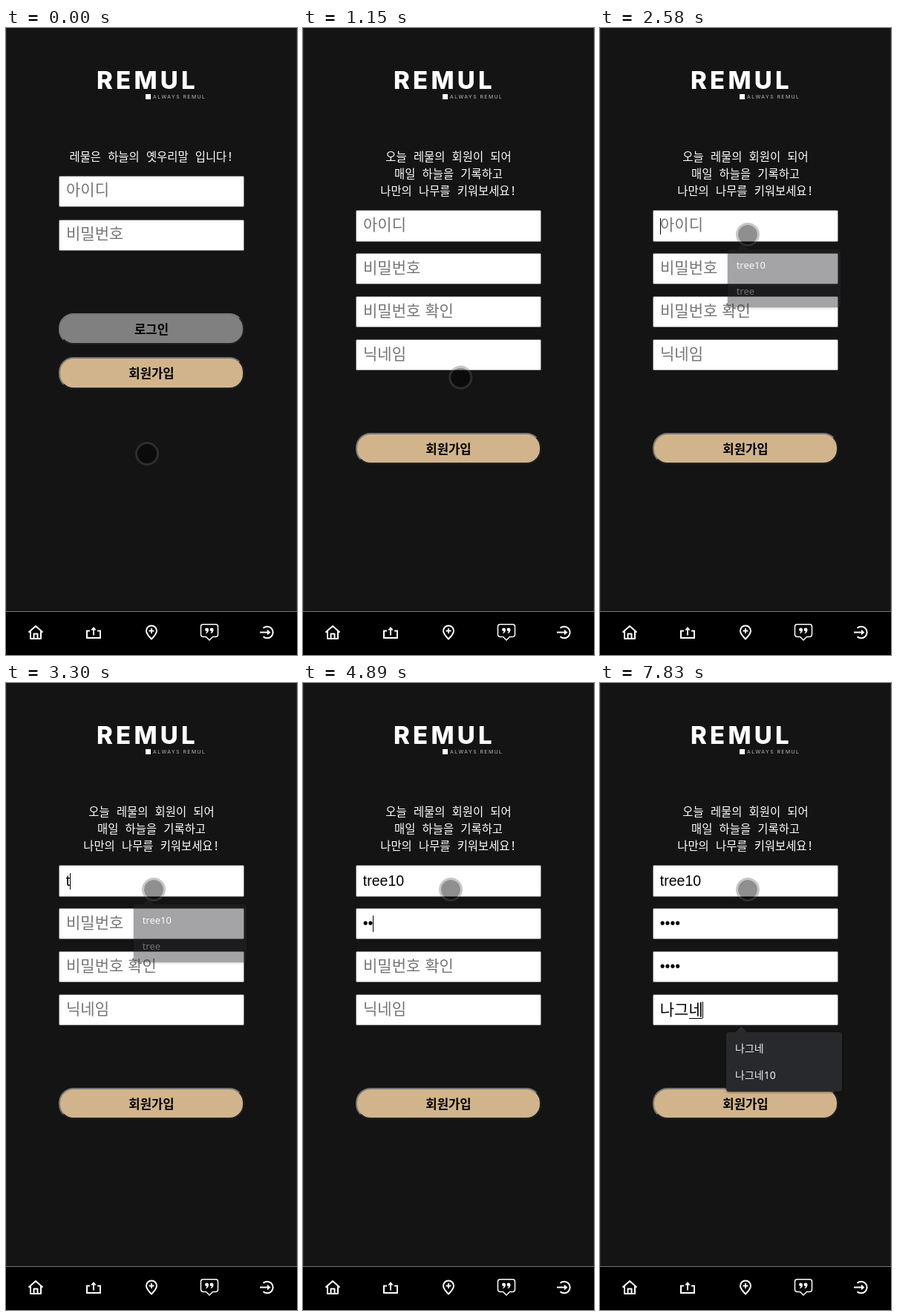
An HTML page for the animation above (8000 ms loop, 392 by 844 pixels).

```html
<!DOCTYPE html>
<html lang="ko">
<head>
<meta charset="utf-8">
<title>Sign up</title>
<style>
  html, body { margin: 0; width: 100%; height: 100%; overflow: hidden; background: #141414; }
  svg { display: block; width: 392px; height: 844px; }
  text { font-family: "Noto Sans CJK KR", "Noto Sans CJK", sans-serif; }
  .brand, .tag { font-family: Inter, "Open Sans", sans-serif; fill: #fff; }
  .brand { font-size: 33px; font-weight: 800; letter-spacing: 4.2px; }
  .tag { font-size: 6.8px; letter-spacing: 1.5px; fill: #bdbdbd; }
  .intro { font: 500 15.4px "Noto Sans Mono", "Noto Sans CJK KR", "Noto Sans CJK", monospace; fill: #fff; text-anchor: middle; }
  .hint { font-size: 21px; font-weight: 350; fill: #757575; }
  .latin { font-family: "Liberation Sans", Arial, sans-serif; font-size: 19.5px; }
  .hangul { font-size: 21px; font-weight: 350; }
  .label { font-size: 16.7px; font-weight: 700; text-anchor: middle; }
  .item { font: 13.3px "Noto Sans", "Noto Sans CJK KR", "Noto Sans CJK", sans-serif; fill: #f1f1f1; }
  .item.ko { font-size: 14px; }
  #popup { filter: drop-shadow(0 1px 1.5px rgba(0, 0, 0, .5)); }
  .icon { fill: none; stroke: #fff; stroke-width: 2; }
</style>
</head>
<body>
<svg viewBox="0 0 392 844" xmlns="http://www.w3.org/2000/svg">
  <rect width="392" height="844" fill="#141414"/>
  <path d="M.5 0V785M391.5 0V785" stroke="#282828"/>
  <text class="brand" x="122" y="82">REMUL</text>
  <rect x="188" y="89" width="7" height="7" fill="#fff"/>
  <text class="tag" x="198" y="94.5">ALWAYS REMUL</text>
  <g id="login"></g>
  <g id="join"></g>
  <rect id="caret" width="1" height="22"/>
  <path id="underline" stroke="#000"/>
  <g id="pointer">
    <circle r="13" fill="#000" fill-opacity=".44"/>
    <circle r="14.5" fill="none" stroke="#5f5f5f" stroke-opacity=".35" stroke-width="3"/>
  </g>
  <g id="popup"></g>

  <rect y="785" width="392" height="59"/>
  <path d="M0 785.5H392" stroke="#777"/>
  <g class="icon">
    <path d="M30.5 813.5L40 805L49.5 813.5M33 811.5V822H47V811.5M37.5 822V815.5H42.5V822" stroke-linejoin="round"/>
    <path d="M113 811.5H109V821H127V811.5H123M118 817.5V808"/>
    <path d="M114.2 810.5L118 806L121.8 810.5Z" fill="#fff" stroke="none"/>
    <path d="M196 822.5C191.5 818 189 815 189 811.5A7 7 0 0 1 203 811.5C203 815 200.500 818 196 822.500ZM192.500 811.500H199.500M196 808V815"/>
    <path d="M265.500 802.700H282.500A3 3 0 0 1 285.500 805.700V816.500A3 3 0 0 1 282.500 819.500H278.500L274 824L269.500 819.500H265.500A3 3 0 0 1 262.500 816.500V805.700A3 3 0 0 1 265.500 802.700Z" stroke-width="1.500"/>
    <g fill="#fff" stroke="none">
      <circle cx="270.500" cy="809.800" r="2.400"/><circle cx="277" cy="809.800" r="2.400"/>
      <path d="M272.900 809.500C273 812.500 272 814.200 269.500 815L269 814C270.500 813.200 270.800 812.500 270.800 811.500ZM279.400 809.500C279.500 812.500 278.500 814.200 276 815L275.500 814C277 813.200 277.300 812.500 277.300 811.500Z"/>
    </g>
    <path d="M346.500 807.800A7.800 7.800 0 1 1 346.500 819.200M342 813.500H353"/>
    <path d="M352 809.800L356.500 813.500L352 817.200Z" fill="#fff" stroke="none"/>
  </g>
</svg>
<script>
const LOOP = 8000;
const $ = id => document.getElementById(id);

function add(parent, tag, attrs, content) {
  const el = document.createElementNS('http://www.w3.org/2000/svg', tag);
  for (const k in attrs) el.setAttribute(k, attrs[k]);
  if (content) el.textContent = content;
  parent.appendChild(el);
  return el;
}
const set = (el, attrs) => { for (const k in attrs) el.setAttribute(k, attrs[k]); };
const show = (el, on) => el.setAttribute('display', on ? 'inline' : 'none');

// Last entry of a [time, ...values] list that has started
const at = (list, t) => list.reduce((found, e) => e[0] <= t ? e : found, list[0]);

function intro(page, lines) {
  lines.forEach((s, i) => add(page, 'text', { class: 'intro', x: 196, y: 178.5 + 23 * i }, s));
}

function field(page, y, h, hintY, hint) {
  add(page, 'rect', { x: 71.5, y: y + .5, width: 249, height: h - 1, rx: 1.5, fill: '#fff', stroke: '#767676' });
  return add(page, 'text', { class: 'hint', x: 81, y: hintY }, hint);
}

// Outset border: the two colours meet on the diagonals of two corners
function button(page, y, h, fill, label) {
  const r = 19, d = r * (1 - Math.SQRT1_2), x0 = 72, x1 = 320, y0 = y + 1, y1 = y + h - 1;
  const arc = (x, y) => `A${r} ${r} 0 0 1 ${x} ${y}`;
  const low = `${x0 + d} ${y1 - d}`, high = `${x1 - d} ${y0 + d}`;
  add(page, 'rect', { x: x0, y: y0, width: x1 - x0, height: y1 - y0, rx: r, fill });
  const edge = path => add(page, 'path', { d: path, fill: 'none', 'stroke-width': 2 });
  const lit = edge(`M${low}${arc(x0, y1 - r)}V${y0 + r}${arc(x0 + r, y0)}H${x1 - r}${arc(x1 - d, y0 + d)}`);
  const dark = edge(`M${high}${arc(x1, y0 + r)}V${y1 - r}${arc(x1 - r, y1)}H${x0 + r}${arc(x0 + d, y1 - d)}`);
  add(page, 'text', { class: 'label', x: 196, y: y + h / 2 + 6.7 }, label);
  const press = down => {
    lit.setAttribute('stroke', down ? '#202020' : '#767676');
    dark.setAttribute('stroke', down ? '#767676' : '#202020');
  };
  press(false);
  return press;
}

const login = $('login'), join = $('join');
intro(login, ['레물은 하늘의 옛우리말 입니다!']);
field(login, 199, 42, 225, '아이디');
field(login, 258, 42, 284, '비밀번호');
button(login, 384, 42, '#808080', '로그인');
const pressJoin = button(login, 443, 43, '#d2b48c', '회원가입');

intro(join, ['오늘 레물의 회원이 되어', '매일 하늘을 기록하고', '나만의 나무를 키워보세요!']);
const dots = n => '•'.repeat(n);
const fields = [
  { y: 245, hint: '아이디', kind: 'latin',
    typed: [[0, ''], [3300, 't'], [3390, 'tr'], [3480, 'tre'], [3580, 'tree'], [3890, 'tree1'], [4090, 'tree10']] },
  { y: 303, hint: '비밀번호', kind: 'latin',
    typed: [[0, ''], [4700, dots(1)], [4800, dots(2)], [4900, dots(3)], [5000, dots(4)]] },
  { y: 361, hint: '비밀번호 확인', kind: 'latin',
    typed: [[0, ''], [5410, dots(1)], [5510, dots(2)], [5620, dots(3)], [5820, dots(4)]] },
  { y: 419, hint: '닉네임', kind: 'hangul',
    typed: [[0, ''], [7320, 'ㄴ'], [7420, '나'], [7520, '낙'], [7620, '나그'], [7720, '나근'], [7830, '나그네']] }
];
fields.forEach((f, i) => {
  f.hintEl = field(join, f.y, i ? 42 : 43, f.y + 27, f.hint);
  f.caretY = [256, 313, 371, 429][i];
  f.textEl = add(join, 'text', { class: f.kind, x: 80.8, y: f.caretY + (i < 3 ? 17.3 : 17.6) });
});
button(join, 545, 42, '#d2b48c', '회원가입');

const popup = $('popup');
const panel = add(popup, 'rect', { x: 170, width: 156, rx: 4, fill: '#28292d' });
const tip = add(popup, 'path', { fill: '#28292d' });
const items = [0, 1].map(() => add(popup, 'text', { x: 182 }));

// time, field (-1 for none)
const caretSteps = [[0, -1], [2080, 0], [2990, -1], [3300, 0], [4390, 1], [5200, 2], [6020, 3], [6520, -1], [7020, 3]];
// time, opacity, rows, top
const popupSteps = [
  [0, 0, 2, 297], [2080, .42, 2, 297], [2170, 1, 2, 297], [2470, .8, 2, 297], [2580, .42, 2, 297], [2680, 0, 2, 297],
  [3300, .42, 2, 297], [3390, 1, 2, 297], [3890, 1, 1, 297], [4190, .42, 1, 297], [4290, 0, 1, 297],
  [7420, .42, 2, 470], [7520, 1, 2, 470]
];
// start, end, steps, from, to
const moves = [
  [290, 740, 6, [190, 573], [213, 482]],
  [1150, 1780, 7, [213, 482], [201, 274]],
  [2080, 2080, 1, [201, 274], [199, 278]]
];

function pointerAt(t) {
  let p = moves[0][3];
  for (const [start, end, n, a, b] of moves) {
    if (t < start) break;
    const gap = (end - start) / (n - 1 || 1) || 1;
    const k = Math.min(n, Math.floor((t - start) / gap + 1.001)) / n;
    const e = k * k * (3 - 2 * k);
    p = a.map((v, i) => v + (b[i] - v) * e);
  }
  return p;
}

function drawPopup(t) {
  const [, alpha, rows, top] = at(popupSteps, t);
  show(popup, alpha > 0);
  const h = 8 + 36 * rows, scale = alpha < 1 ? .975 : 1;
  const names = top > 400 ? ['나그네', '나그네10'] : ['tree10', 'tree'];
  const cy = top + h / 2;
  set(popup, { opacity: alpha, transform: `translate(248 ${cy}) scale(${scale}) translate(-248 ${-cy})` });
  set(panel, { y: top, height: h });
  set(tip, { d: `M182 ${top + .5}L190.500 ${top - 8}L199 ${top + .5}Z` });
  items.forEach((el, i) => {
    show(el, i < rows);
    set(el, { y: top + 27 + 36 * i, class: top > 400 ? 'item ko' : 'item' });
    el.textContent = names[i];
  });
}

function draw(t) {
  const joining = t >= 1150;
  show(login, !joining);
  show(join, joining);
  pressJoin(t >= 940);

  for (const f of fields) {
    const value = at(f.typed, t)[1];
    if (f.textEl.textContent !== value) f.textEl.textContent = value;
    show(f.hintEl, !value);
  }

  const active = fields[at(caretSteps, t)[1]];
  show($('caret'), !!active);
  if (active) {
    const width = active.textEl.textContent ? active.textEl.getComputedTextLength() : 0;
    set($('caret'), { x: Math.max(81, Math.floor(80.8 + width)), y: active.caretY });
  }

  // The syllable being composed is underlined
  const nick = fields[3].textEl;
  const composing = !!nick.textContent;
  show($('underline'), composing);
  if (composing) {
    const end = 80.8 + nick.getComputedTextLength();
    set($('underline'), { d: `M${Math.round(end - 18.5)} 451.5H${Math.round(end - .5)}` });
  }

  const [x, y] = pointerAt(t);
  set($('pointer'), { transform: `translate(${x} ${y})` });
  drawPopup(t);
}

const began = performance.now();
function tick() {
  draw((performance.now() - began) % LOOP);
  requestAnimationFrame(tick);
}
tick();
</script>
</body>
</html>
```
